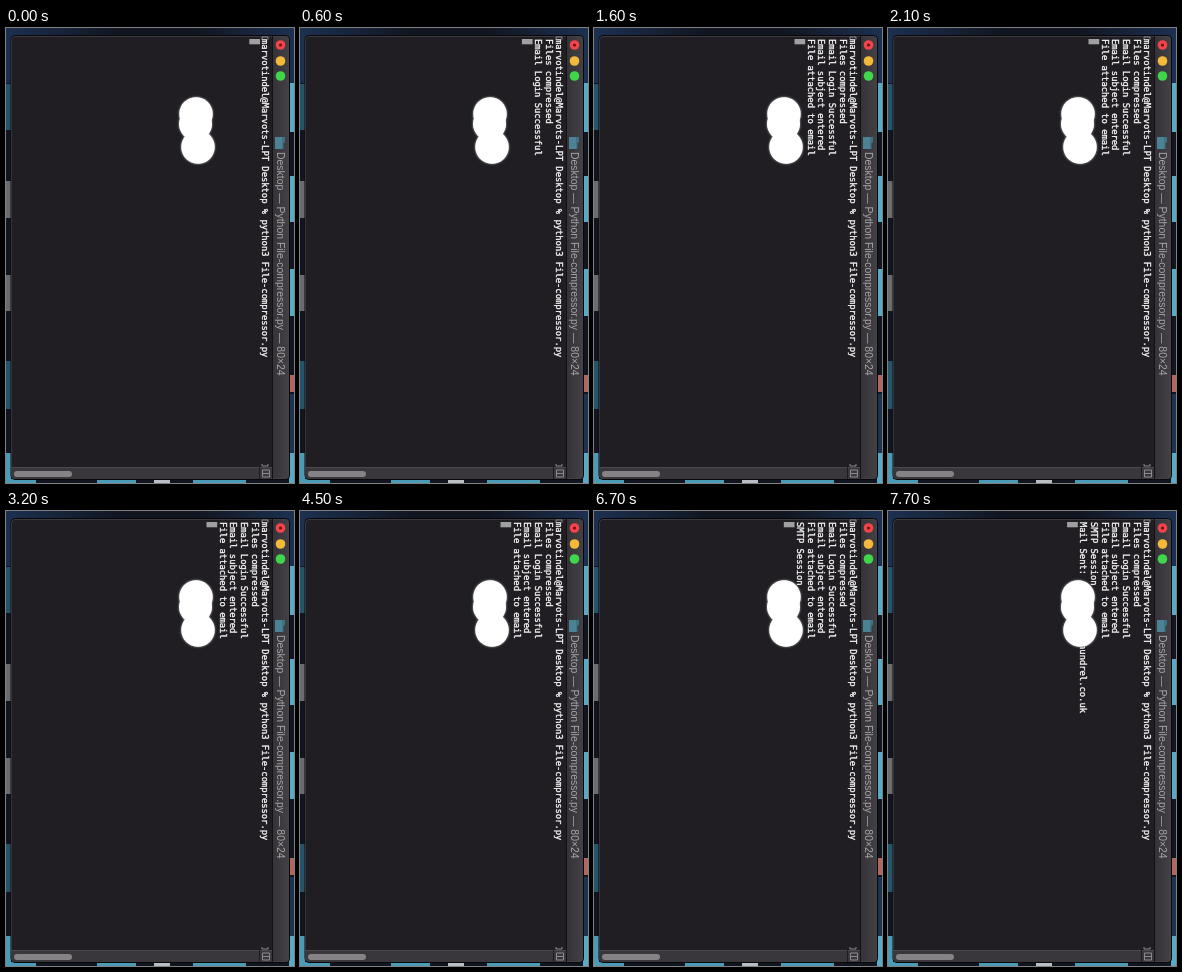
Recreate the animation shown at these times as an HTML page. Size 288 px wide and 455 px high, loop 8000 ms.

```html
<!DOCTYPE html>
<html lang="en">
<head>
<meta charset="utf-8">
<title>Terminal</title>
<style>
  html, body { margin: 0; width: 100%; height: 100%; overflow: hidden; background: #10151f; }
  svg { display: block; }
  text { white-space: pre; }
  .mono { font: 8.82px "DejaVu Sans Mono", monospace; fill: #f6f6f6; stroke: #f6f6f6; stroke-width: .35; }
  .title { font: 10.45px "Liberation Sans", sans-serif; fill: #a7a6a9; }
</style>
</head>
<body>
<svg width="288" height="455" viewBox="0 0 288 455">
  <defs>
    <linearGradient id="bar" x2="0" y2="1">
      <stop stop-color="#434145"/><stop offset="1" stop-color="#353337"/>
    </linearGradient>
    <linearGradient id="sky" x2="0" y2="1">
      <stop stop-color="#1c3050"/><stop offset=".35" stop-color="#10151f"/>
      <stop offset=".6" stop-color="#10151f"/><stop offset="1" stop-color="#1c3050"/>
    </linearGradient>
  </defs>
  <!-- Landscape screen turned a quarter clockwise -->
  <g transform="translate(288) rotate(90)">
    <rect width="455" height="288" fill="#10151f"/>
    <rect width="55" height="288" fill="url(#sky)"/>
    <path d="M366 0h59v5h-59z" fill="#1d3450"/>
    <path d="M55 0h49v5h-49zM148 0h46v5h-46zM241 0h47v5h-47zM425 0h30v5h-30z" fill="#5aa9c5"/>
    <path d="M425 283h30v5h-30zM451 258h4v30h-4zM451 158h4v39h-4zM451 48h4v53h-4z" fill="#4b9ab6"/>
    <path d="M56 283h46v5h-46zM333 283h48v5h-48z" fill="#24556a"/>
    <path d="M153 283h37v5h-37zM247 283h36v5h-36z" fill="#6b6c70"/>
    <path d="M451 124h4v16h-4z" fill="#b9bec2"/>
    <path d="M347 0h17v5h-17z" fill="#b1665f"/>

    <rect x="7.5" y="4.5" width="444" height="278.5" rx="4" fill="#201e23" stroke="#08080a"/>
    <path d="M8 21V9q0-4 4-4H447q4 0 4 4V21z" fill="url(#bar)"/>
    <rect x="8.500" y="5.500" width="442" height="277" rx="3.500" fill="none" stroke="#48464b" stroke-width=".7"/>
    <path d="M8 21.500H451" stroke="#121114"/>
    <circle cx="17" cy="13.500" r="4.800" fill="#f2444b"/>
    <circle cx="17" cy="13.500" r="1.600" fill="#6e1016"/>
    <circle cx="33" cy="13.500" r="4.800" fill="#f5b93a"/>
    <circle cx="48" cy="13.500" r="4.800" fill="#3fd64b"/>
    <path d="M109 9h5l1 1.500h6v8.500h-12z" fill="#3d7386"/>
    <path d="M109 12h12v7h-12z" fill="#4b8295"/>
    <text class="title" x="124" y="17">Desktop — Python File-compressor.py — 80×24</text>

    <path d="M439 22h12v257q0 4-4 4h-8z" fill="#39373b"/>
    <path d="M439.500 22V283" stroke="#4b494d"/>
    <rect x="443" y="222" width="6" height="58" rx="3" fill="#858386"/>
    <path d="M439 34.500h12" stroke="#1c1b1e"/>
    <path d="M442 24.500h7v7h-7zM445.500 24.500v7" fill="none" stroke="#8c8a8e"/>

    <path d="M11.500 26H9v6h2.500M436 26h2v6h-2" fill="none" stroke="#a5a4a7" stroke-width=".8"/>
    <g id="lines"></g>
    <rect id="cursor" x="11" width="5.300" height="10.700" fill="#a09fa2"/>
    <g fill="#fff" style="filter:drop-shadow(0 0 .8px #aaa)">
      <circle cx="86" cy="98" r="16.800"/>
      <circle cx="96" cy="98.500" r="16.500"/>
      <circle cx="119" cy="96" r="16.800"/>
    </g>
  </g>
</svg>
<script>
const LOOP = 8000, PITCH = 10.7;
// [time shown in ms, text]
const output = [
  [0, "marvotindel@Marvots-LPT Desktop % python3 File-compressor.py"],
  [100, "Files compressed"],
  [600, "Email Login Successful"],
  [1000, "Email subject entered"],
  [1000, "File attached to email"],
  [6500, "SMTP Session"],
  [7500, "Mail Sent: " + " ".repeat(12) + "hundrel.co.uk"]
];
const cursor = document.getElementById("cursor");
const rows = output.map(([, text], i) => {
  const row = document.createElementNS("http://www.w3.org/2000/svg", "text");
  row.setAttribute("class", "mono");
  row.setAttribute("x", 11);
  row.setAttribute("y", 31.7 + PITCH * i);
  row.textContent = text;
  return document.getElementById("lines").appendChild(row);
});

function draw() {
  const time = performance.now() % LOOP;
  const shown = output.filter(([start]) => start <= time).length;
  rows.forEach((row, i) => row.setAttribute("visibility", i < shown ? "visible" : "hidden"));
  cursor.setAttribute("y", 23.3 + PITCH * shown);
  requestAnimationFrame(draw);
}
draw();
</script>
</body>
</html>
```
